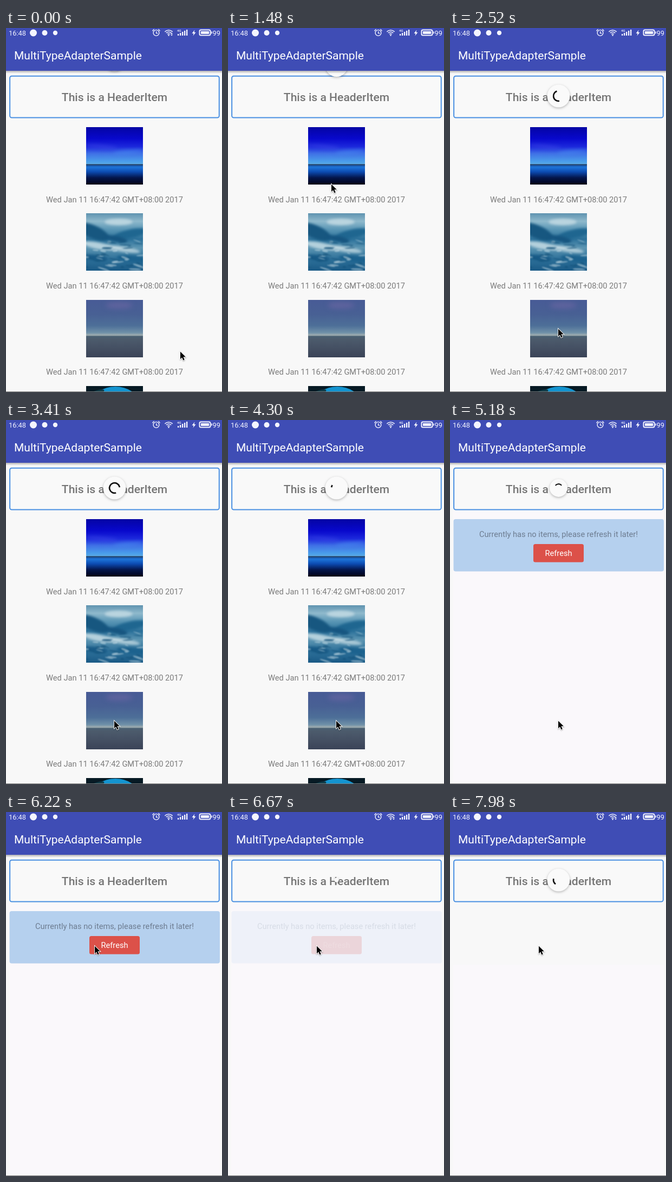
An HTML page with a canvas that plays this animation: 399 px wide and 672 px high, repeating every 8 s.

```html
<!DOCTYPE html>
<html lang="en">
<head>
<meta charset="utf-8">
<style>
html, body { margin: 0; width: 100%; height: 100%; overflow: hidden; background: #f8f8f8; }
canvas { display: block; }
</style>
</head>
<body>
<canvas id="stage" width="399" height="672"></canvas>
<script>
const ctx = document.getElementById('stage').getContext('2d');
const LOOP = 8000, STEP = 148.15, CYCLE = 1332, RAD = Math.PI / 180;
const BLUE = '#3f4db5', PAGE = '#f8f8f8', PAGE_TINT = '#faf8fb';
const DATE = 'Wed Jan 11 16:47:42 GMT+08:00 2017';

// Moments of the refresh gesture, in ms.
const RELEASED = 2027, SPIN_START = 2227, LOADED = 5140, CLICKED = 6568, REOPENED = 6625;
const HOME_Y = 125.5, PULL = 67, MIN_ARC = 18, MAX_ARC = 288;

const clamp = v => Math.max(0, Math.min(1, v));
const ramp = (t, from, length) => clamp((t - from) / length);
const smooth = k => k * k * (3 - 2 * k);
const decelerate = k => 1 - (1 - k) ** 2;
const mix = (a, b, k) => a + (b - a) * k;

// Cubic bezier (.4, 0, .2, 1), solved by bisection.
function ease(x) {
  let lo = 0, hi = 1;
  for (let i = 0; i < 20; i++) {
    const u = (lo + hi) / 2, v = 1 - u;
    if (1.2 * v * v * u + 0.6 * v * u * u + u * u * u < x) lo = u; else hi = u;
  }
  return 3 * (1 - lo) * lo * lo + lo ** 3;
}

const stepAt = t => t < 6668 ? Math.floor((t + 8) / 148.2) : 45 + Math.floor((t - 6668) / 145.6);

function rect(x, y, w, h, color) {
  ctx.fillStyle = color;
  ctx.fillRect(x, y, w, h);
}

function roundRect(x, y, w, h, r, fill, stroke) {
  ctx.beginPath();
  ctx.roundRect(x, y, w, h, r);
  if (fill) { ctx.fillStyle = fill; ctx.fill(); }
  if (stroke) { ctx.strokeStyle = stroke; ctx.lineWidth = 2; ctx.stroke(); }
}

function disc(x, y, r, color) {
  ctx.fillStyle = color;
  ctx.beginPath();
  ctx.arc(x, y, r, 0, 7);
  ctx.fill();
}

function poly(points, color) {
  ctx.fillStyle = color;
  ctx.beginPath();
  points.forEach(p => ctx.lineTo(...p));
  ctx.closePath();
  ctx.fill();
}

function arc(x, y, r, from, to, width, color) {
  ctx.strokeStyle = color;
  ctx.lineWidth = width;
  ctx.beginPath();
  ctx.arc(x, y, r, from * RAD, to * RAD);
  ctx.stroke();
}

function text(str, x, y, size, color, weight = 400, align = 'center') {
  ctx.font = `${weight} ${size}px Roboto, sans-serif`;
  ctx.textAlign = align;
  ctx.fillStyle = color;
  ctx.fillText(str, x, y);
}

function gradient(g, stops) {
  const fill = g.createLinearGradient(0, 0, 0, 106);
  stops.forEach(([at, color]) => fill.addColorStop(at, color));
  g.fillStyle = fill;
  g.fillRect(0, 0, 105, 106);
}

function picture(paint) {
  const c = document.createElement('canvas');
  c.width = 105;
  c.height = 106;
  paint(c.getContext('2d'));
  return c;
}

function blob(g, x, y, rx, ry, color, tilt = 0) {
  g.fillStyle = color;
  g.beginPath();
  g.ellipse(x, y, rx, ry, tilt, 0, 7);
  g.fill();
}

const pictures = [
  picture(g => {
    gradient(g, [[0, '#0404a4'], [.2, '#0808cc'], [.34, '#1c28dc'], [.46, '#3f70e6'],
      [.6, '#4a9fea'], [.64, '#5aa8e4'], [.652, '#20344c'], [.668, '#1c58a8'], [.7, '#1c74d8'],
      [.78, '#0c4ab0'], [.88, '#04164c'], [1, '#000014']]);
    g.filter = 'blur(3px)';
    blob(g, 28, 36, 30, 3, 'rgba(60,70,230,.6)', .08);
    blob(g, 78, 46, 28, 3, 'rgba(70,140,240,.6)', -.08);
  }),
  picture(g => {
    gradient(g, [[0, '#5f93b0'], [.14, '#8fb9cc'], [.28, '#5a96b5'], [.45, '#2c719a'],
      [.6, '#5c95b2'], [.8, '#2d7099'], [1, '#1a5a86']]);
    g.filter = 'blur(2px)';
    blob(g, 60, 16, 26, 6, '#b9d4df');
    blob(g, 12, 34, 32, 12, '#175780', .4);
    blob(g, 82, 38, 32, 8, '#1f6690', -.2);
    blob(g, 55, 47, 22, 5, '#165580', .2);
    blob(g, 22, 60, 30, 6, '#b4d0dc', .2);
    blob(g, 66, 66, 34, 5, '#a9c8d6', .15);
    blob(g, 84, 84, 28, 6, '#1c628e', .1);
    blob(g, 16, 82, 24, 5, '#185a86', .1);
    let seed = 7;
    const random = () => (seed = seed * 16807 % 2147483647) / 2147483647;
    g.filter = 'blur(1px)';
    for (let i = 0; i < 40; i++) {
      blob(g, random() * 105, 44 + random() * 60, 3 + random() * 9, .8 + random() * 1.3,
        i % 2 ? 'rgba(205,225,234,.5)' : 'rgba(18,80,120,.55)', random() * .6 - .2);
    }
  }),
  picture(g => {
    gradient(g, [[0, '#485b96'], [.25, '#486094'], [.45, '#4d6f98'], [.57, '#6f90a8'],
      [.615, '#a0adb0'], [.635, '#4a6072'], [.68, '#4c5b6c'], [.85, '#444f62'], [1, '#3a4357']]);
    g.filter = 'blur(4px)';
    blob(g, 61, 10, 25, 6, '#5f639e');
  }),
  picture(g => {
    gradient(g, [[0, '#061923'], [1, '#0a2634']]);
    blob(g, 54, 30, 42, 29, '#1494d0');
    blob(g, 20, 12, 14, 4, '#123c48', -.3);
  })
];

function statusBar(dataActive) {
  const white = '#f4f5ff';
  rect(0, 0, 399, 79, BLUE);
  text('16:48', 5, 13.5, 12.8, white, 400, 'left');
  disc(50.5, 9, 6.5, white);
  disc(71.5, 9, 5, white);
  disc(91, 9, 4.2, white);

  arc(277.5, 9, 5.4, 0, 360, 1.4, white);
  arc(277.5, 9, 7.6, 205, 240, 1.4, white);
  arc(277.5, 9, 7.6, 300, 335, 1.4, white);
  rect(277, 6, 1.3, 4, white);
  rect(277, 9, 3.5, 1.3, white);

  [3, 6.3, 9.6].forEach(r => arc(300.5, 13.5, r, 222, 318, 1.5, white));
  disc(300.5, 13.5, 1.3, white);
  if (dataActive) {
    poly([[304, 11], [306, 8.5], [308, 11]], white);
    poly([[304, 12], [306, 14.5], [308, 12]], white);
  }

  text('4G', 316, 7, 6, white, 500, 'left');
  for (let i = 0; i < 5; i++) {
    const h = 3 + i * 2;
    rect(317 + i * 4, 14 - h, 2.3, h, white);
  }
  poly([[348.5, 3.5], [343.5, 10], [346.5, 10], [345.5, 14.5], [350.5, 8], [347.5, 8]], white);
  roundRect(357.5, 3.5, 20, 10, 2.5, null, white);
  rect(360, 6, 15, 5, white);
  rect(379, 6.5, 1.6, 4, white);
  text('99', 381.5, 13.5, 12.8, white, 400, 'left');
  text('MultiTypeAdapterSample', 15, 58, 21, '#fff', 400, 'left');

  const shade = ctx.createLinearGradient(0, 79, 0, 84);
  shade.addColorStop(0, 'rgba(0,0,0,.28)');
  shade.addColorStop(1, 'rgba(0,0,0,0)');
  rect(0, 79, 399, 5, shade);
}

function header() {
  roundRect(7.1, 88.8, 386.7, 76.7, 3.5, '#f9f9f9', '#4a90e2');
  text('This is a HeaderItem', 200.5, 135, 21.1, '#757575', 500);
}

function photoList() {
  pictures.forEach((image, i) => {
    const y = 183 + i * 159.4;
    ctx.drawImage(image, 148, Math.round(y));
    if (i < 3) text(DATE, 200.5, y + 138.5, 14.65, '#7b7b7b');
  });
}

function emptyCard(alpha) {
  ctx.globalAlpha = alpha;
  roundRect(6.5, 183, 388.5, 96.5, 4, '#b5d0ee');
  text('Currently has no items, please refresh it later!', 200.5, 216.3, 14.65, '#6d7c90');
  roundRect(154, 229, 93, 33.5, 3.5, '#dc5149');
  text('Refresh', 200.5, 251.3, 14.65, '#fff');
  ctx.globalAlpha = 1;
}

// Tail and head of the progress arc in degrees; start is where a cycle begins.
function spinAngles(t, start, base) {
  const turns = (t - start) / CYCLE, count = Math.floor(turns), p = turns - count;
  const origin = base + 576 * count + 306 * p, reach = MAX_ARC - MIN_ARC;
  return [origin + reach * ease(clamp(2 * p - 1)) - MIN_ARC / 2,
    origin + reach * ease(clamp(2 * p)) + MIN_ARC / 2];
}

// The long arc left by the pull first closes up for half a cycle, then cycles run.
function pulledSpinAngles(t) {
  const closed = SPIN_START + CYCLE / 2, p = (t - SPIN_START) / (CYCLE / 2);
  if (p >= 1) return spinAngles(t, closed, 324);
  const head = 333 - 146 * (1 - p);
  return [head - mix(MAX_ARC, MIN_ARC, p), head];
}

function spinner(y, scale, angles, alpha = 1) {
  if (scale <= 0) return;
  ctx.save();
  ctx.translate(200.5, y);
  ctx.scale(scale, scale);
  ctx.shadowColor = 'rgba(0,0,0,.28)';
  ctx.shadowBlur = 4;
  ctx.shadowOffsetY = 1.5;
  disc(0, 0, 21, '#fafafa');
  ctx.shadowColor = 'transparent';
  ctx.globalAlpha = alpha;
  if (angles) arc(0, 0, 9.4, ...angles, 2.7, '#111');
  ctx.restore();
}

// Position and arc of the circle while a finger pulls it down by the given distance.
function pulled(distance) {
  const over = Math.max(0, distance) / 2, part = Math.min(1, over / PULL);
  const tension = Math.min(2, Math.max(0, over - PULL) / PULL) / 4;
  const extra = 2 * (tension - tension * tension);
  const shown = Math.max(part - .4, 0) / .6;
  const head = 187 - (1 - shown) * 300 - (.41 - extra) * 360;
  return {
    y: HOME_Y + PULL * (part - 1 + 2 * extra),
    angles: [head - MAX_ARC * shown, head],
    alpha: part < 1 ? .3 : 1
  };
}

function refreshIndicator(t, pointerY) {
  if (t < SPIN_START - 10) {
    const { y, angles, alpha } = pulled(t > 900 ? pointerY - 268 : 0);
    spinner(mix(y, HOME_Y, decelerate(ramp(t, RELEASED, 200))), 1, angles, alpha);
  } else if (t < REOPENED) {
    spinner(HOME_Y, 1 - smooth(ramp(t, LOADED, 150)), pulledSpinAngles(t));
  } else {
    const start = 6980;
    spinner(HOME_Y, decelerate(ramp(t, REOPENED, 400)), t > start && spinAngles(t, start, 41));
  }
}

// Pointer stops as [step, x, y]; it speeds up and slows down between them.
const stops = [[0, 322, 598], [5, 175, 260], [6, 175, 260], [10, 191, 289], [14, 200, 556],
  [39, 200, 556], [42, 164, 248], [60, 164, 248]];

function pointerAt(n) {
  const i = stops.findIndex(stop => stop[0] > n), a = stops[i - 1], b = stops[i];
  const k = smooth((n - a[0]) / (b[0] - a[0]));
  return [mix(a[1], b[1], k), mix(a[2], b[2], k)];
}

function cursor(x, y) {
  ctx.save();
  ctx.translate(x, y - .5);
  ctx.scale(.94, .94);
  ctx.beginPath();
  [[0, 0], [0, 14.5], [3.3, 11.5], [5.8, 17], [8.2, 16], [5.8, 10.5], [10.5, 10.5]]
    .forEach(p => ctx.lineTo(...p));
  ctx.closePath();
  ctx.shadowColor = 'rgba(0,0,0,.35)';
  ctx.shadowBlur = 2;
  ctx.shadowOffsetY = 1;
  ctx.strokeStyle = '#fff';
  ctx.lineWidth = 2;
  ctx.stroke();
  ctx.shadowColor = 'transparent';
  ctx.fillStyle = '#000';
  ctx.fill();
  ctx.restore();
}

function render(time) {
  const n = stepAt(time), t = n * STEP, [x, y] = pointerAt(n);
  rect(0, 0, 399, 672, PAGE);
  const cardAlpha = 1 - ramp(t, CLICKED, 120);
  if (t > LOADED) {
    const top = cardAlpha > 0 ? 168 : 282;
    rect(6, top, 389, 672 - top, PAGE_TINT);
  }
  header();
  if (t < LOADED) photoList();
  else if (cardAlpha > 0) emptyCard(cardAlpha);
  refreshIndicator(t, y);
  statusBar(t < 1300 || t > LOADED);
  rect(0, 671, 399, 1, '#777');
  cursor(x, y);
}

function tick() {
  render(performance.now() % LOOP);
  requestAnimationFrame(tick);
}
tick();
</script>
</body>
</html>
```
